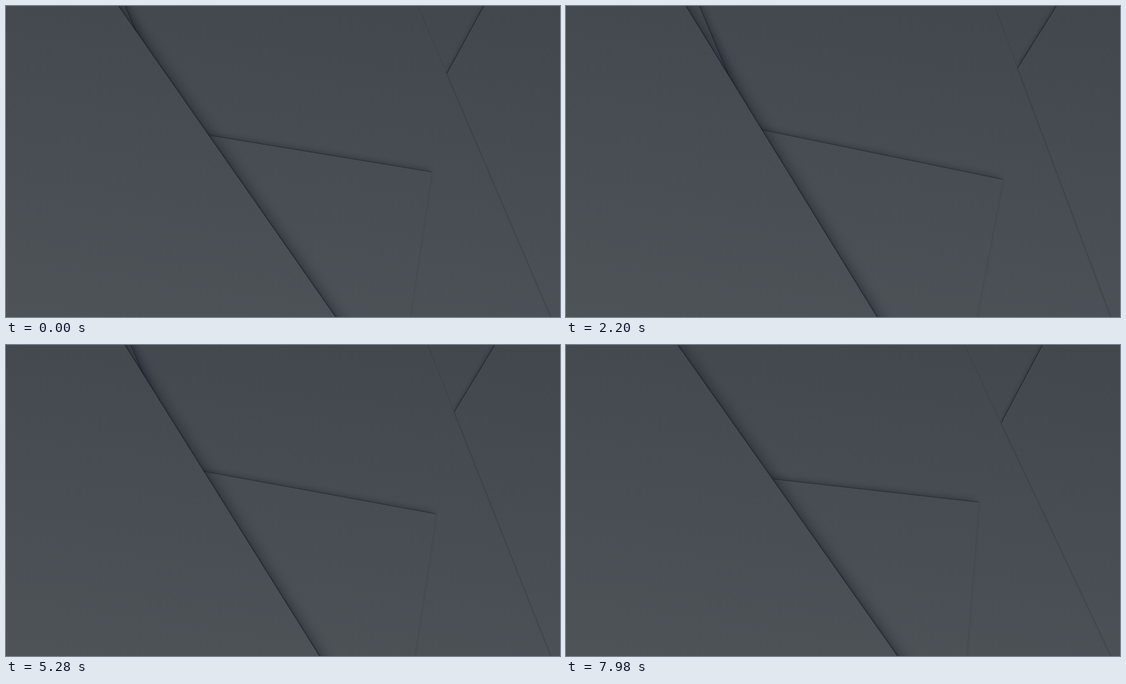
Recreate the animation shown at these times as an HTML page with a canvas. Size 998 by 561 pixels, loop 8000 ms.

```html
<!DOCTYPE html>
<html lang="en">
<head>
<meta charset="utf-8">
<title>Paper layers</title>
<style>
  html, body { margin: 0; width: 100%; height: 100%; overflow: hidden; background: #484d53; }
  canvas { display: block; width: 100vw; height: 100vh; }
</style>
</head>
<body>
<canvas id="stage" width="998" height="561"></canvas>
<script>
const W = 998, H = 561, LOOP = 8000;
const ABOVE = -80, BELOW = H + 80, LEFT = -80, RIGHT = W + 80;
const ctx = document.getElementById('stage').getContext('2d');

const paper = ctx.createLinearGradient(W, 0, W - 104, 695);
paper.addColorStop(0, '#42474e');
paper.addColorStop(1, '#4e5358');

// Slow swing that reaches `peak` at time `turn` (seconds) and curves away on both sides.
function swing(t, turn, peak, curve) {
  const dt = t - turn;
  return peak + curve * dt * dt * (1 - 0.06 * dt);
}

// Point at height y on the line through two points.
function atHeight([x1, y1], [x2, y2], y) {
  return [x1 + (x2 - x1) * (y - y1) / (y2 - y1), y];
}

function trace(points) {
  ctx.beginPath();
  points.forEach(([x, y]) => ctx.lineTo(x, y));
}

function line(points, alpha, width = 1) {
  trace(points);
  ctx.strokeStyle = `rgba(16,21,29,${alpha})`;
  ctx.lineWidth = width;
  ctx.stroke();
}

// Sheet of paper with a dark rim outside `edge` and layered soft shadows.
function panel(edge, rest, rim, ...shadows) {
  line(edge, rim, 2);
  trace([...edge, ...rest]);
  ctx.fillStyle = paper;
  for (const [alpha, blur, dx, dy] of shadows) {
    ctx.shadowColor = `rgba(18,23,34,${alpha})`;
    ctx.shadowBlur = blur;
    ctx.shadowOffsetX = dx;
    ctx.shadowOffsetY = dy;
    ctx.fill();
  }
  ctx.shadowColor = 'transparent';
}

function drawCorner(t) {
  const corner = [swing(t, 3.1, 815.5, -1.85), swing(t, 2.5, 112, 1.45)];
  const top = [swing(t, 3.4, 887, -1.85), 0];
  const seamEnd = [982, H];
  panel([atHeight(top, corner, ABOVE), corner],
    [atHeight(corner, seamEnd, BELOW), [RIGHT, BELOW], [RIGHT, ABOVE]],
    0.6, [0.4, 9, 2, -6], [0.35, 3, 0, -1]);
  line([atHeight(corner, seamEnd, 0), corner, seamEnd], 0.16);
}

function drawTriangle(t, top, bottom) {
  const joint = atHeight(top, bottom, swing(t, 2.9, 223.5, 1.05));
  const tip = [swing(t, 2.75, 788, -2.35), swing(t, 2.75, 314, -1.58)];
  const tipEnd = [swing(t, 3.1, 741.3, -1.15), H];
  const tail = atHeight(joint, tip, joint[1] - 8);
  panel([tail, tip], [atHeight(tip, tipEnd, BELOW), [bottom[0] - 100, BELOW]],
    0.4, [0.36, 12, -5, -4], [0.25, 3, -1, -1]);
  line([tip, tipEnd], 0.06);
}

function drawSliver(t) {
  const x = swing(t, 2.75, 240.5, -3);
  const start = [x, 0], end = [x + 0.42 * H, H];
  panel([atHeight(start, end, ABOVE), end], [[LEFT, H], [LEFT, ABOVE]],
    0.5, [0.4, 14, 3, -3], [0.35, 3, 1, 0]);
}

function draw(t) {
  const top = [swing(t, 3.4, 217, -1.07), 0];
  const bottom = [swing(t, 3.4, 555.5, 2.7), H];

  ctx.fillStyle = paper;
  ctx.fillRect(0, 0, W, H);
  drawCorner(t);
  drawTriangle(t, top, bottom);
  drawSliver(t);
  panel([atHeight(top, bottom, ABOVE), atHeight(top, bottom, BELOW)],
    [[LEFT, BELOW], [LEFT, ABOVE]],
    0.7, [0.46, 23, 4, -5], [0.4, 4, 1, -1]);
}

function frame(now) {
  draw(now % LOOP / 1000);
  requestAnimationFrame(frame);
}
draw(0);
requestAnimationFrame(frame);
</script>
</body>
</html>
```
